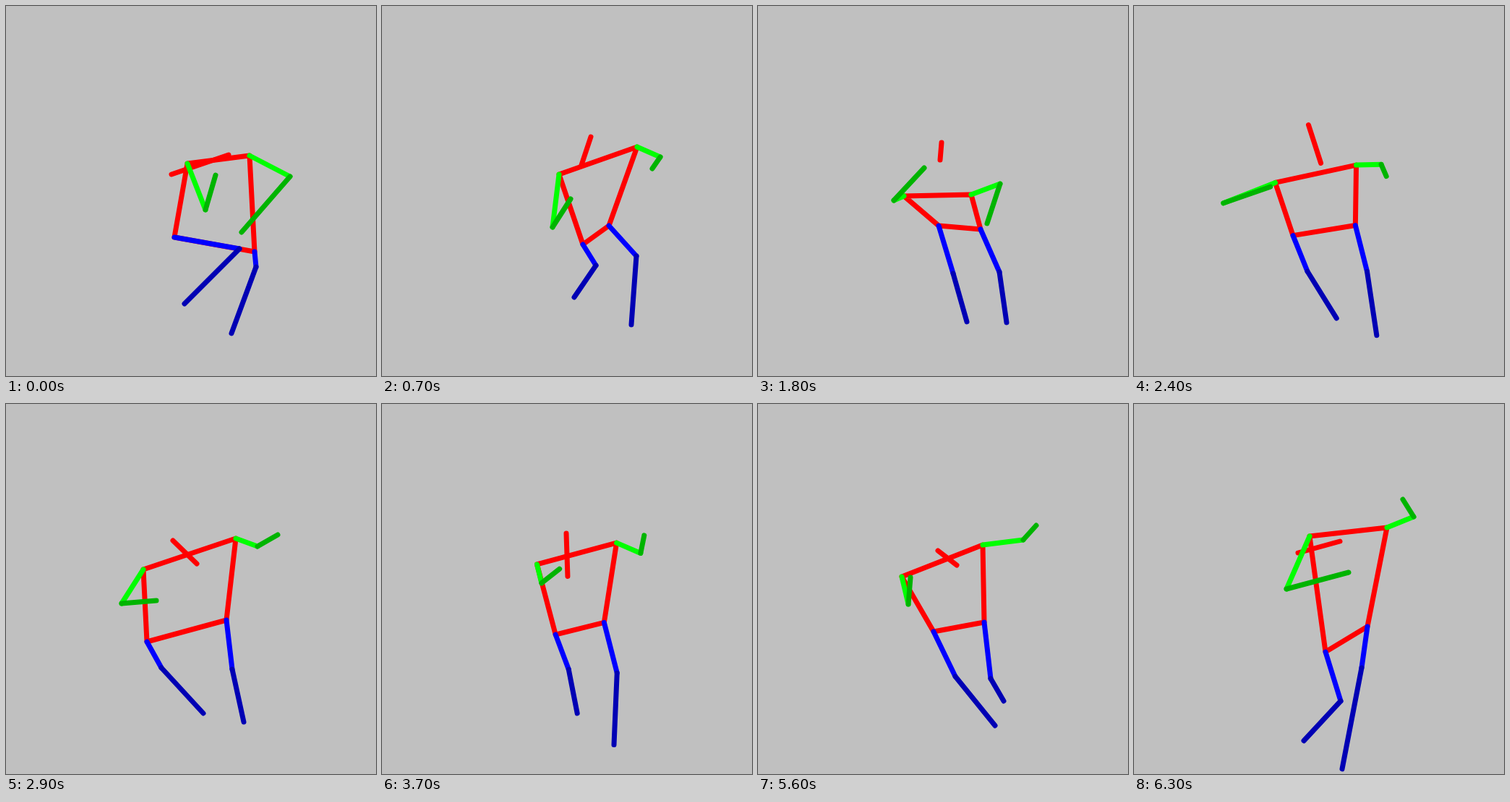
Write an HTML page with a canvas that moves like this. It is 512 px wide and 512 px high and loops after 6.4 s.

```html
<!DOCTYPE html>
<html lang="en">
<head>
<meta charset="utf-8">
<title>Dancing stick figure</title>
<style>
  html, body { margin: 0; width: 100%; height: 100%; overflow: hidden; background: #c0c0c0; }
  canvas { display: block; width: 512px; height: 512px; }
</style>
</head>
<body>
<canvas id="stage" width="512" height="512"></canvas>
<script>
const ctx = document.getElementById('stage').getContext('2d');
const LOOP = 6400, STEP = 100;
const times = [0, 700, 1800, 2900, 4600, 5600, 6300];

// A joint passes through one point per key time; swings maps a segment
// to an extra [dx, dy] that peaks halfway through it.
function joint(xs, ys, swings = {}) {
  return (seg, u) => {
    const [dx, dy] = swings[seg] || [0, 0];
    const bump = Math.sin(Math.PI * u) ** 2;
    const mix = v => v[seg] + (v[seg + 1] - v[seg]) * u;
    return [mix(xs) + dx * bump, mix(ys) + dy * bump];
  };
}

const head = {
  top: joint([308, 289, 254, 231, 282, 249, 285], [206, 181, 189, 189, 168, 203, 190], { 1: [0, -10], 2: [0, -25] }),
  base: joint([229, 276, 252, 264, 249, 275, 227], [233, 220, 213, 221, 258, 223, 206])
};

const left = {
  shoulder: joint([251, 245, 202, 190, 242, 199, 243], [218, 233, 263, 229, 214, 239, 183]),
  elbow: joint([276, 236, 188, 160, 247, 208, 211], [282, 306, 269, 276, 216, 277, 256],
    { 2: [-50, 0], 3: [20, 0], 4: [-60, 0] }),
  hand: joint([290, 261, 230, 208, 288, 211, 297], [234, 267, 224, 272, 179, 240, 233], { 2: [-30, 0] }),
  hip: joint([233, 278, 250, 195, 291, 243, 265], [320, 330, 304, 329, 308, 315, 343]),
  knee: joint([323, 296, 270, 215, 307, 273, 286], [336, 359, 370, 365, 370, 377, 411]),
  foot: joint([247, 266, 289, 273, 267, 328, 235], [412, 403, 437, 428, 428, 445, 466])
};

const right = {
  shoulder: joint([337, 353, 295, 318, 332, 311, 350], [207, 195, 261, 186, 199, 195, 171]),
  elbow: joint([393, 385, 335, 348, 369, 367, 387], [236, 209, 246, 197, 217, 188, 156], { 1: [25, 0], 5: [20, 0] }),
  hand: joint([326, 374, 317, 376, 348, 385, 372], [313, 225, 301, 181, 246, 168, 132], { 3: [0, -30], 4: [0, -70] }),
  hip: joint([344, 314, 308, 305, 310, 313, 323], [340, 304, 309, 299, 306, 302, 308]),
  knee: joint([346, 352, 334, 313, 339, 322, 315], [361, 346, 368, 367, 378, 380, 365]),
  foot: joint([312, 345, 344, 329, 312, 340, 288], [453, 441, 438, 440, 465, 411, 505],
    { 0: [0, 12], 2: [0, 17], 3: [0, 20], 4: [0, 25] })
};

const bones = [];
const bone = (color, ...joints) => bones.push({ color, joints });

bone('#f00', head.top, head.base);
bone('#f00', left.shoulder, right.shoulder, right.hip, left.hip, left.shoulder);
for (const side of [left, right]) {
  bone('#0f0', side.shoulder, side.elbow);
  bone('#00b400', side.elbow, side.hand);
}
for (const side of [left, right]) {
  bone('#00f', side.hip, side.knee);
  bone('#0000b4', side.knee, side.foot);
}

ctx.lineWidth = 7;
ctx.lineCap = ctx.lineJoin = 'round';

function draw() {
  const t = Math.floor(performance.now() % LOOP / STEP) * STEP;
  let seg = 0;
  while (seg < times.length - 2 && t >= times[seg + 1]) seg++;
  const u = (t - times[seg]) / (times[seg + 1] - times[seg]);

  ctx.fillStyle = '#c0c0c0';
  ctx.fillRect(0, 0, 512, 512);
  for (const { color, joints } of bones) {
    ctx.strokeStyle = color;
    ctx.beginPath();
    for (const at of joints) ctx.lineTo(...at(seg, u));
    ctx.stroke();
  }
  requestAnimationFrame(draw);
}
draw();
</script>
</body>
</html>
```
